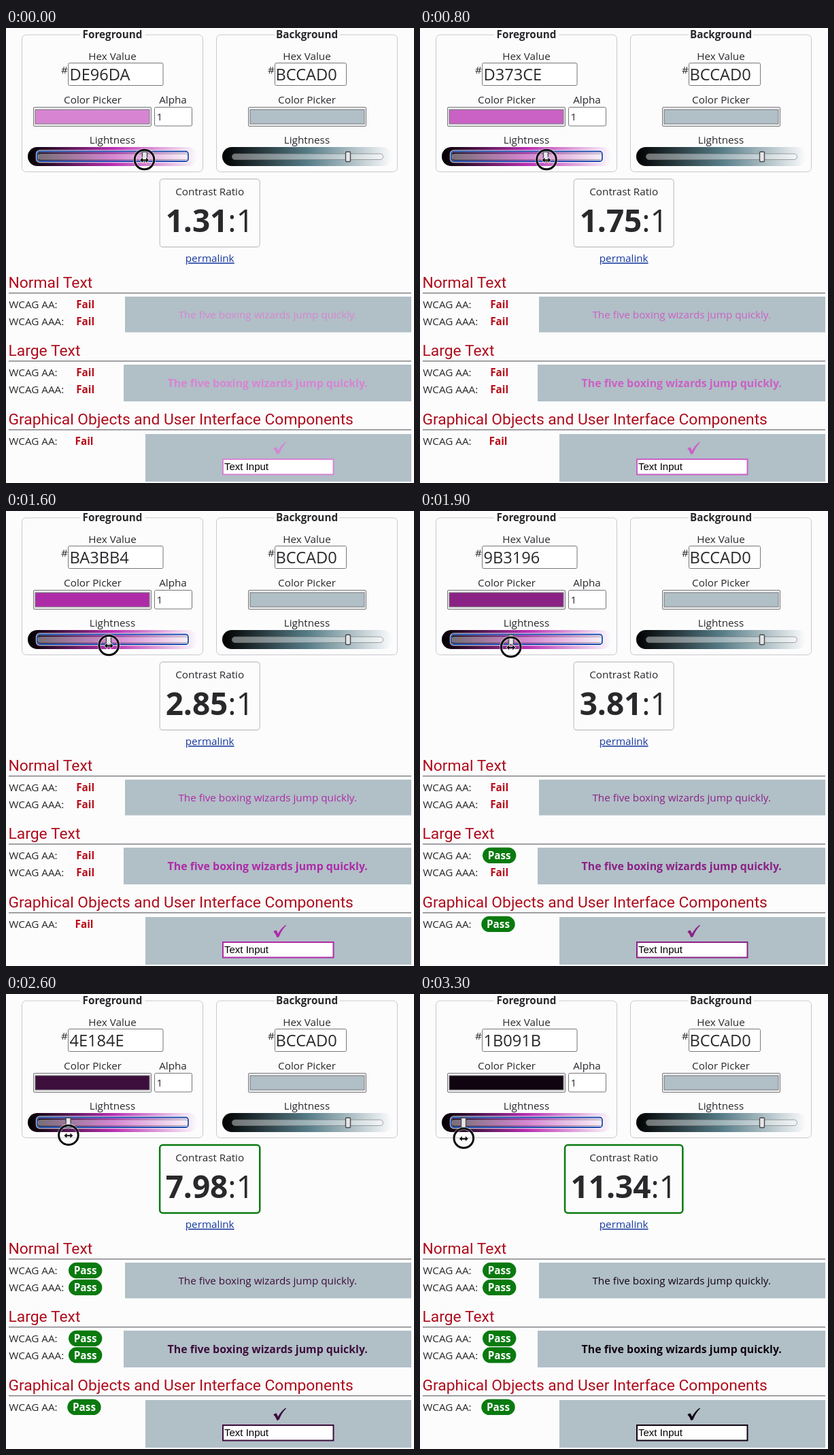
Write an HTML page that moves like this. It is 600x669 px and loops after 3400 ms.

```html
<!DOCTYPE html>
<html lang="en">
<head>
<meta charset="utf-8">
<title>Contrast checker</title>
<style>
  html, body { margin: 0; width: 100%; height: 100%; overflow: hidden; background: #fcfcfd; }
  svg { display: block; width: 600px; height: 669px; font: 15.25px "Open Sans", sans-serif; fill: #29292c; }
  .mid { text-anchor: middle; }
  .bold { font-weight: 700; }
  .hex { font-size: 23.6px; }
  .head { font: 22.85px Roboto, sans-serif; fill: #ad0d1c; }
  .fail { fill: #b90d19; }
  .pass { fill: #fff; }
  .field { fill: #fff; stroke: #77777a; }
  .frame { fill: none; stroke: #c9c9cc; }
  .panel { fill: #b1bfc7; }
</style>
</head>
<body>
<svg id="stage" viewBox="0 0 600 669"></svg>
<script>
const LOOP = 3400, STEP = 100;
// time, lightness in %, pointer x, pointer y
const KEYS = [
  [0, 73, 203.5, 193.5], [800, 64, 186, 193.5], [1300, 55, 167, 195.5], [1900, 40, 133.7, 200],
  [2300, 28, 107.7, 204.5], [2900, 13, 78, 210], [3300, 7, 64.3, 212]
];
const BACKDROP = [188, 202, 208];

const rect = (x, y, w, h, attrs = '') => `<rect x="${x}" y="${y}" width="${w}" height="${h}" ${attrs}/>`;
const text = (x, y, content, cls = '', attrs = '') => `<text x="${x}" y="${y}" class="${cls}" ${attrs}>${content}</text>`;
const mid = (x, y, content, cls = '', attrs = '') => text(x, y, content, 'mid ' + cls, attrs);

function gradient(id, colour) {
  return `<linearGradient id="${id}"><stop stop-color="#000"/><stop offset=".5" stop-color="${colour}"/><stop offset="1" stop-color="#fcfcfd"/></linearGradient>`;
}

function fieldset(x, title, centre, hexX, hexW, pickerX, pickerMid, swatchId) {
  return rect(x, 10, 266, 201.5, 'rx="6" class="frame"')
    + rect(centre - 48, 5, 96, 10, 'fill="#fcfcfd"')
    + mid(centre, 15, title, 'bold')
    + mid(centre, 47, 'Hex Value')
    + text(hexX - 10.5, 67, '#')
    + rect(hexX, 51.5, hexW, 33, 'rx="2" class="field"')
    + mid(pickerMid, 111, 'Color Picker')
    + rect(pickerX, 116.5, 173, 28, 'rx="1.5" class="field" style="fill:#f0f0f1"')
    + rect(pickerX + 2.5, 120, 168, 21, `id="${swatchId}" class="panel" stroke="#77777a"`)
    + mid(centre, 170, 'Lightness');
}

function track(x, gradientId) {
  return rect(x - 14, 175, 250, 28, `rx="14" fill="url(#${gradientId})"`)
    + rect(x + .5, 185, 222, 8.5, 'rx="4.2" fill="#fff" fill-opacity=".42" stroke="#777" stroke-opacity=".65"');
}

function thumb(id, x) {
  return rect(-3.5, 182, 7, 14.5, `id="${id}" transform="translate(${x})" rx="1.5" fill="#e6e7e9" stroke="#4a4a4d" stroke-width="1.4"`);
}

// label, centre x of the verdict, baseline, ratio needed
const CHECKS = [
  ['WCAG AA:', 116.7, 412, 4.5], ['WCAG AAA:', 116.7, 437, 7],
  ['WCAG AA:', 116.7, 512, 3], ['WCAG AAA:', 116.7, 536.5, 4.5],
  ['WCAG AA:', 115, 613, 3]
];
const SECTIONS = [
  ['Normal Text', 382, 175, 395, 52.5],
  ['Large Text', 482, 173, 495, 54],
  ['Graphical Objects and User Interface Components', 583, 205, 597, 70]
];
const PANGRAM = 'The five boxing wizards jump quickly.';

const stage = document.getElementById('stage');
stage.innerHTML = '<defs>' + gradient('pinks', '#b92fb1') + gradient('greys', '#567c87') + '</defs>'
  + fieldset(23.5, 'Foreground', 156.5, 91.5, 139.5, 40.5, 127.5, 'swatch')
  + text(93.5, 77, '', 'hex', 'id="hex"')
  + mid(245.5, 111, 'Alpha')
  + rect(218.5, 116.5, 55, 27.5, 'rx="2" class="field"')
  + text(221.5, 136, '1')
  + track(46, 'pinks')
  + rect(45.5, 181, 223, 15.5, 'rx="4" fill="none" stroke="#fff" stroke-opacity=".7" stroke-width="3.4"')
  + rect(46, 181.5, 222, 14.5, 'rx="3.5" fill="none" stroke="#1c4fae" stroke-width="1.8"')
  + thumb('thumb', 0)
  + fieldset(309.5, 'Background', 442.5, 395.5, 105, 356.5, 442.5, 'backdrop')
  + text(396.5, 77, 'BCCAD0', 'hex')
  + track(332, 'greys')
  + thumb('restingThumb', 503)
  + rect(0, 222, 0, 100, 'id="box" rx="4.5" fill="none"')
  + mid(299.7, 246, 'Contrast Ratio')
  + mid(299.7, 300, '<tspan id="ratio" class="bold"></tspan><tspan>:1</tspan>', '', 'font-size="45.9"')
  + mid(299.7, 344, 'permalink', '', 'fill="#16389c" text-decoration="underline"')
  + SECTIONS.map(([title, y, x, top, height]) => text(3.5, y, title, 'head')
      + rect(4, y + 7.3, 592, 1, 'fill="#4b4b50"')
      + rect(x, top, 596 - x, height, 'class="panel"')).join('')
  + CHECKS.map(([label, x, y], i) => text(4.3, y, label)
      + rect(x - 24.7, y - 17.3, 49.4, 23.4, `id="pill${i}" rx="11.7" fill="#0a7a0f"`)
      + mid(x, y, '', 'bold', `id="verdict${i}"`)).join('')
  + '<g id="sample">'
  + mid(384.7, 427, PANGRAM)
  + mid(384.7, 528, PANGRAM, 'bold', 'font-size="15.87"')
  + '<path d="M393.3 618.7C395.5 616.4 397.6 616 398.3 617.5L400 621.5Q404.5 613 411.3 608.4L412 609.4Q405.5 615.5 401.5 626L398.4 627Q396.5 621.3 393.3 618.7Z"/></g>'
  + rect(319, 634, 162.5, 22.5, 'id="input" fill="#fff" stroke-width="2"')
  + text(321, 650, 'Text Input', '', 'fill="#000" style="font:15px \'Liberation Sans\',sans-serif"')
  + `<g id="pointer"><circle r="14.3" fill="none" stroke="#fff" stroke-opacity=".6" stroke-width="4.6"/>
     <circle r="14.3" fill="none" stroke="#0c0c0e" stroke-width="3"/>
     <path d="M-6.5 .8l4-3.8v2.7h5v-2.7l4 3.8l-4 3.8v-2.7h-5v2.7z" fill="#111" stroke="#fff" stroke-width="1.2" paint-order="stroke"/></g>`;

const ui = {};
stage.querySelectorAll('[id]').forEach(node => ui[node.id] = node);
const set = (node, attrs) => Object.entries(attrs).forEach(([k, v]) => node.setAttribute(k, v));

function slope(i, col) {
  const a = KEYS[Math.max(0, i - 1)], b = KEYS[Math.min(KEYS.length - 1, i + 1)];
  return (b[col] - a[col]) / (b[0] - a[0]);
}

// Cubic Hermite curve through the keys
function valueAt(time, col) {
  let i = 0;
  while (i < KEYS.length - 2 && time >= KEYS[i + 1][0]) i++;
  const a = KEYS[i], b = KEYS[i + 1], span = b[0] - a[0], u = (time - a[0]) / span;
  const ease = u * u * (3 - 2 * u);
  return a[col] + (b[col] - a[col]) * ease
    + span * u * (1 - u) * ((1 - u) * slope(i, col) - u * slope(i + 1, col));
}

function pinkAt(lightness) {
  const l = lightness / 100, reach = .52 * Math.min(l, 1 - l);
  const hueShift = lightness > 34 ? 3 : lightness > 20 ? 2 : 0;
  return [l + reach, l - reach, l + reach - 2 * reach * hueShift / 60].map(v => Math.round(v * 255));
}

function luminance(rgb) {
  const [r, g, b] = rgb.map(v => (v /= 255) <= .03928 ? v / 12.92 : ((v + .055) / 1.055) ** 2.4);
  return .2126 * r + .7152 * g + .0722 * b;
}

// The screen shows colours a little darker than their hex values
const shown = rgb => `rgb(${rgb.map(v => Math.round(255 * (v / 255) ** 1.22))})`;

function draw(ms) {
  const time = Math.floor((ms % LOOP) / STEP) * STEP;
  const lightness = Math.round(valueAt(time, 1));
  const rgb = pinkAt(lightness), colour = shown(rgb);
  const contrast = (luminance(BACKDROP) + .05) / (luminance(rgb) + .05);
  const label = String(Math.floor(contrast * 100) / 100);
  const passes = contrast >= 4.5;
  const width = Math.max(125, 26.2 * label.length + 42.3);

  ui.hex.textContent = rgb.map(v => v.toString(16).padStart(2, '0')).join('').toUpperCase();
  ui.ratio.textContent = label;
  set(ui.swatch, { style: `fill:${colour}` });
  set(ui.sample, { fill: colour });
  set(ui.input, { stroke: colour });
  set(ui.thumb, { transform: `translate(${49.2 + 2.12 * lightness})` });
  set(ui.pointer, { transform: `translate(${valueAt(time, 2)} ${valueAt(time, 3)})` });
  set(ui.box, { x: 299.7 - width / 2, width, stroke: passes ? '#0a7a0f' : '#c9c9cc', 'stroke-width': passes ? 2.5 : 1.3 });
  CHECKS.forEach(([, , , needed], i) => {
    const ok = contrast >= needed, verdict = ui['verdict' + i];
    set(ui['pill' + i], { visibility: ok ? 'visible' : 'hidden' });
    verdict.textContent = ok ? 'Pass' : 'Fail';
    set(verdict, { class: 'mid bold ' + (ok ? 'pass' : 'fail') });
  });
}

const start = performance.now();
function tick() {
  draw(performance.now() - start);
  requestAnimationFrame(tick);
}
tick();
</script>
</body>
</html>
```
